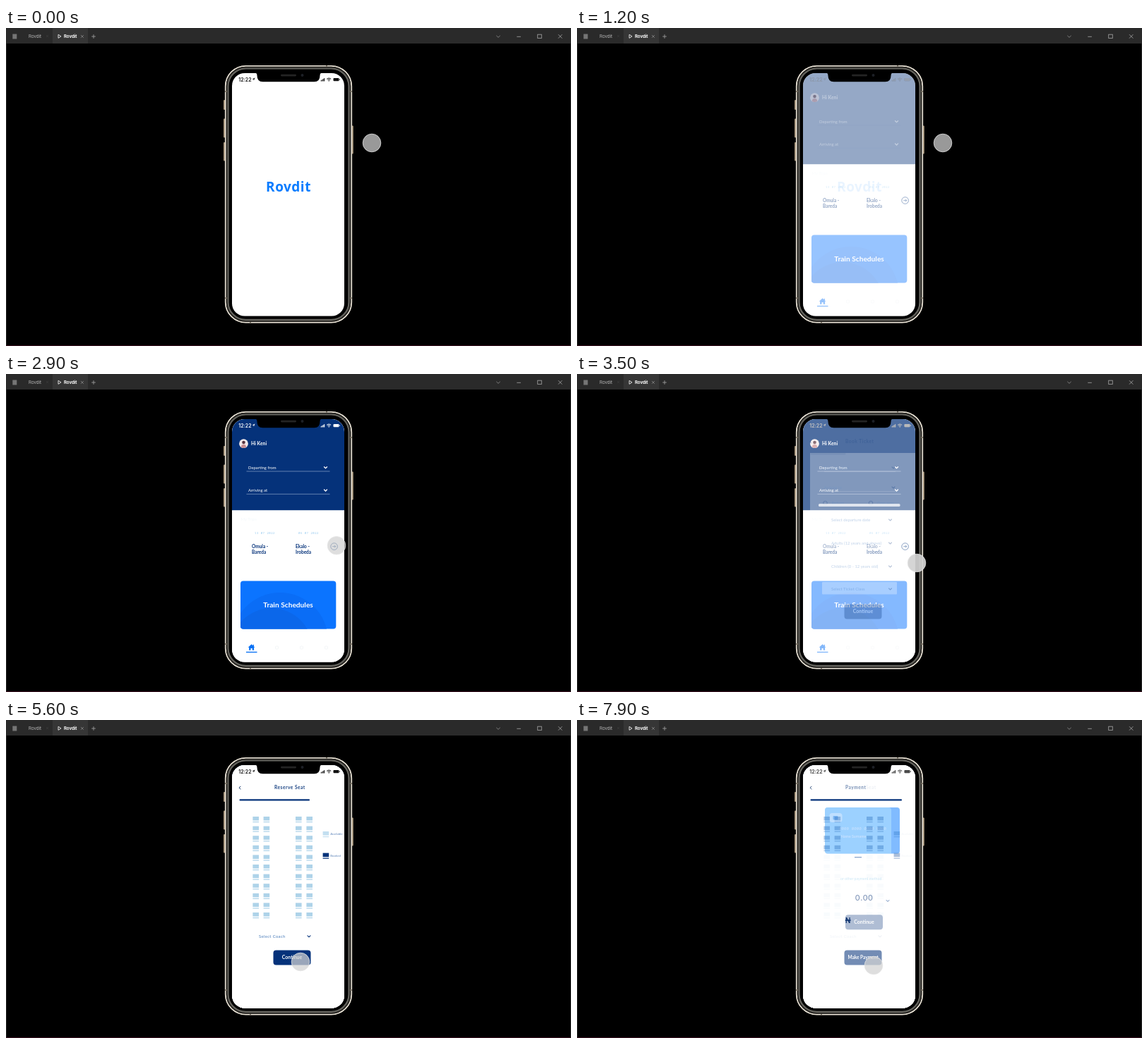
An HTML page for the animation above (8 s loop, 800 px wide and 451 px high).

```html
<!DOCTYPE html>
<html lang="en">
<head>
<meta charset="utf-8">
<title>Ticket app prototype</title>
<style>
html, body { margin: 0; width: 100%; height: 100%; overflow: hidden; background: #000; }
svg { display: block; width: 100vw; height: 100vh; }
text { font-family: Lato, "Open Sans", sans-serif; white-space: pre; }
.ui { font-family: Inter, Roboto, sans-serif; }
.logo { font-family: "Open Sans", "Noto Sans", sans-serif; }
.mono { font-family: "Noto Sans Mono", "DejaVu Sans Mono", monospace; }
</style>
</head>
<body>
<svg id="stage" viewBox="0 0 800 451" preserveAspectRatio="none"></svg>
<script>
const LOOP = 8000, STEP = 100;
const BRAND = 'Rovdit';
const NAVY = '#05327a', BLUE = '#0a7cff', LINK = '#2c68b4';

// Markup helpers
const rect = (x, y, w, h, fill, more = '') =>
  `<rect x="${x}" y="${y}" width="${w}" height="${h}" fill="${fill}" ${more}/>`;
const text = (x, y, s, size, fill, more = '') =>
  `<text x="${x}" y="${y}" font-size="${size}" fill="${fill}" ${more}>${s}</text>`;
const line = (d, color, w = 1, more = '') =>
  `<path d="${d}" fill="none" stroke="${color}" stroke-width="${w}" ${more}/>`;
const circle = (x, y, r, fill, more = '') =>
  `<circle cx="${x}" cy="${y}" r="${r}" fill="${fill}" ${more}/>`;
const group = (s, more = '') => `<g ${more}>${s}</g>`;
const down = (x, y, color, w = 1.1, more = '') =>
  line(`M${x - 2} ${y - 1}l2 2l2 -2`, color, w, `stroke-linecap="round" ${more}`);
const bold = 'font-weight="700"', mid = 'text-anchor="middle"';
const range = (n, f) => Array.from({ length: n }, (_, i) => f(i)).join('');

function windowBar() {
  const g = '#9b9b9b';
  return rect(0, 0, 800, 22, '#2a2a2a') + rect(66, 0, 50, 22, '#363636') +
    rect(9.3, 8.5, 6, 7, '#757575') +
    text(32, 14.2, BRAND, 6.2, '#b9b9b9', 'class="ui"') +
    line('M57 10l3 3m0 -3l-3 3', '#404040', .7) +
    line('M74 9.3v5l4 -2.5z', '#eee', .9) +
    text(82, 14.2, BRAND, 6, '#fff', 'class="ui" font-weight="700"') +
    line('M106 10l3.8 3.8m0 -3.8l-3.8 3.8', '#8c8c8c', .8) +
    line('M121.2 12h5.6m-2.8 -2.8v5.6', g, .9) +
    line('M694.3 10.8l2.7 2.5l2.7 -2.5', '#858585', .9) +
    line('M723.3 12.3h5.6', g, .9) +
    rect(752.7, 9.2, 5.6, 5.2, 'none', `stroke="${g}" stroke-width=".9"`) +
    line('M782 9.2l5.4 5.4m0 -5.4l-5.4 5.4', g, .9) +
    line('M.5 22V450M799.5 22V450', '#242424') + rect(0, 450, 800, 1, '#38101f');
}

function phoneBody() {
  const button = (x, y, h) => rect(x, y, 2.4, h, '#a9977d', 'rx="1"');
  const ring = (d, color, w) => rect(310.5 + d, 53.5 + d, 179 - 2 * d, 364.4 - 2 * d,
    '#000', `rx="${29 - d}" stroke="${color}" stroke-width="${w}"`);
  return button(308, 102, 14) + button(308, 128.5, 27) + button(308, 162, 26.5) +
    button(489.4, 138.5, 40) +
    ring(.3, '#efe8db', 1.8) + ring(2, '#2e2c28', 1.6) + ring(4, '#676660', 2.2) +
    line('M310 90h3M310 383h3M487 90h3M487 383h3', '#756c5d', 1.6) +
    circle(346, 417.7, 1, '#6f675a') + circle(454, 53.8, 1, '#6f675a');
}

function status(c) {
  return group(text(329.3, 75.6, '12:22', 7, c, 'class="ui" font-weight="600"') +
    `<path d="M352.6 70.5l-4.1 2l2 .3l.3 2z" fill="${c}"/>` +
    range(4, i => rect(445.6 + i * 1.5, 74.2 - i, 1.1, 1.3 + i, c)) +
    line('M454.2 72.2q3 -2.4 6 0M455.5 73.6q1.7 -1.4 3.4 0', c, 1) +
    circle(457.2, 75, .7, c) +
    rect(463.5, 71, 8, 4.2, c, 'rx="1"') + rect(472, 72.2, .7, 1.8, c));
}

const white = () => rect(320, 64, 160, 345, '#fff');
const title = (s, more = '') =>
  text(380, 98.2, s, 6.6, '#1d4685', `${bold} letter-spacing=".5" ${more}`);
const back = () => line('M332.2 93.9l-2 2.2l2 2.2', '#0b2f66', 1);
const action = (s, size = 7, more = '') => group(
  rect(378.5, 326.5, 53, 21, NAVY, 'rx="4"') +
  text(405, 339.3, s, size, '#fff', `${bold} ${mid}`), more);

function splash() {
  return white() + status('#111') +
    text(400, 232, BRAND, 19, BLUE, `id="brand" class="logo" ${bold} ${mid} letter-spacing=".5"`);
}

function home() {
  const field = (y, s) => group(text(343, y + 2, s, 5.9, '#fff') + down(452.5, y, '#fff', 1.3) +
    line(`M340.5 ${y + 5.3}H458.5`, '#8ba2c6', .7));
  const trip = (x, date, a, b) => group(
    text(x + 4, 227.3, date, 4, '#8fc6ee', 'class="mono" letter-spacing=".5"') +
    text(x, 246.7, a + ' -', 6.5, NAVY, bold) + text(x, 255.2, b, 6.5, NAVY, bold));
  return white() + rect(320, 64, 160, 129.2, NAVY) + status('#fff') +
    group(circle(336.5, 98.7, 6.4, '#f3e9ea') +
      '<path d="M332.7 103.8q.4 -4 3.8 -4t3.8 4q-3.8 2.4 -7.6 0z" fill="#c98f92"/>' +
      circle(336.5, 97, 2.3, '#5a3540')) +
    text(347, 101.2, 'Hi Keni', 6.8, '#fff', bold) +
    field(132.7, 'Departing from') + field(165, 'Arriving at') +
    text(332.5, 207.5, 'My Trips', 6, '#f3f8fb') +
    trip(348, '13 07 2022', 'Omula', 'Bareda') + trip(410, '06 07 2022', 'Ekalo', 'Irobeda') +
    group(circle(464.6, 244.6, 4.8, 'none', 'stroke="#0b3a80"') +
      line('M462.3 244.6h4.5m-1.9 -1.9l1.9 1.9l-1.9 1.9', '#0b3a80', .9)) +
    group(rect(332, 293.5, 135.3, 68, '#0b74ff', 'rx="4"') +
      group(circle(388, 378, 68, '#0a6df6') + circle(376, 390, 58, '#0b67ea'), 'clip-path="url(#tile)"') +
      text(399.6, 330.7, 'Train Schedules', 10.2, '#fff', `${bold} ${mid}`)) +
    group('<path d="M347.6 383.3l4.9 4.5h-1.4v4h-2.4v-2.8h-2.2v2.8h-2.4v-4h-1.4z" fill="#0a72f5"/>' +
      rect(349.7, 383.8, 1.3, 2.6, '#0a72f5') + rect(340, 393.8, 15.5, 1.4, '#0a72f5')) +
    group(range(3, i => rect(381.5 + i * 35, 386, 4, 4, 'none', 'rx="1" stroke="#eef1f4" stroke-width=".7"')));
}

function book() {
  const route = (y, s) => group(text(350, y + 2, s, 5.3, '#5e8fca') + down(448, y, NAVY) +
    line(`M350 ${y + 5.5}H451`, '#f2f5f9', .6));
  const radio = (x, tx, s) => group(circle(x, 183, 2.8, 'none', `stroke="${NAVY}" stroke-width=".9"`) +
    text(tx, 185, s, 5.7, '#5585c2', 'letter-spacing=".15"'));
  const pick = (y, s) => rect(347, y - 10, 106, 17.5, '#fff', 'rx="1"') +
    text(360, y + 2, s, 5.9, LINK) + down(443.5, y, NAVY);
  return white() + rect(330, 112, 150, 297, '#fff') + status('#111') + back() + title('Book Ticket') +
    route(132.8, 'Departing from') + route(161, 'Arriving to') +
    radio(351.5, 360.5, 'Return') + radio(416, 425, 'One-way') +
    pick(207, 'Select departure date') + pick(240, 'Adults (12 years and above)') +
    pick(273, 'Children (0 - 12 years old)') + pick(305, 'Select Ticket Class') +
    action('Continue');
}

const seat = (x, y, c) => rect(x, y, 8.6, 5.6, c) + rect(x, y + 7, 8.6, 1.2, c);
const seats = (rows, c, more) => group(range(rows, r =>
  [349.4, 364.6, 410, 425.4].map(x => seat(x, 137 + r * 13.6, c)).join('')), more);

function reserve() {
  const out = 'class="leaving"';
  return white() + status('#111') + back() + title('Reserve Seat', out) +
    seats(11, '#aed3e9', out) +
    group(seat(448.6, 158, '#c3dff0') + text(459.3, 163.4, 'Available', 4.4, '#5b82b8'), out) +
    group(seat(448.6, 188.6, NAVY) + text(459.3, 194, 'Booked', 4.4, '#5b82b8'), out) +
    text(358, 309.2, 'Select Coach', 5.9, '#4a7cba', `letter-spacing=".35" ${out}`) +
    down(429, 306.8, NAVY, 1.1, out) + action('Continue', 7, 'id="moving"');
}

function payment() {
  return white() + status('#111') + back() + title('Payment') +
    rect(351, 124, 106, 65.5, '#1c86ff', 'rx="4"') +
    group('<path d="M351 128q0 -4 4 -4H441q4 0 4 4V189.5H355q-4 0 -4 -4z" fill="#c4f0ff" fill-opacity=".75"/>' +
      rect(357.5, 132, 18, 13, '#f2fcff', 'rx="4"') + rect(362.5, 136, 7, 5.5, '#7fb9ee', 'rx="1"') +
      text(371, 156, '0000 0000 0000 0000', 5.9, '#fff', 'class="mono"') +
      text(374, 166.8, 'Name Surname', 5.2, '#fff', bold)) +
    seats(4, '#1f62b4', 'class="faint"') +
    group(seat(448.6, 158, '#2f78c6') + seat(448.6, 188.6, '#2e62a8'), 'class="faint"') +
    rect(393, 194, 10, 1.3, '#2f5fa6') +
    text(373, 226.8, 'or other payment method', 5.2, '#a3d4ee') +
    text(406.9, 256, '0.00', 11, '#052f74', `${mid} letter-spacing="1"`) +
    down(440, 256.5, '#5f83b5') + action('Make Payment', 6.5);
}

const stage = document.getElementById('stage');
const screens = { splash, home, book, reserve, payment };
stage.innerHTML =
  '<defs><clipPath id="glass"><rect x="320" y="64" width="159" height="344.6" rx="18"/></clipPath>' +
  '<clipPath id="tile"><rect x="332" y="293.5" width="135.3" height="68" rx="4"/></clipPath></defs>' +
  rect(0, 0, 800, 451, '#000') + windowBar() + phoneBody() +
  group(Object.keys(screens).map(k => group(screens[k](), `id="${k}"`)).join('') +
    rect(342, 184, 115.5, 4, '#fff', 'id="slide" rx="1.5"') +
    rect(330.5, 112.2, 50, 2.2, NAVY, 'id="progress" rx="1"') +
    text(379.2, 287.8, '₦', 11, '#0a2f6b', `id="naira" ${bold}`), 'clip-path="url(#glass)"') +
  '<path d="M352 63.5q3.5 0 3.5 4q0 8.7 8 8.7H436.5q8 0 8 -8.7q0 -4 3.5 -4z" fill="#000"/>' +
  rect(389, 65.8, 22, 2.6, '#242424', 'rx="1.3"') + circle(419.5, 67, 2, '#1d2026') +
  circle(0, 0, 12.8, '#d2d2d2', 'id="cursor" stroke="#e4e4e4" stroke-width=".8"');

const $ = id => document.getElementById(id);
const clamp = v => Math.min(1, Math.max(0, v));
const ease = (t, start, span) => {
  const x = clamp((t - start) / span);
  return x * x * (3 - 2 * x);
};

// Each layer of a screen dissolves on its own; leaving layers also fade out
function fade(id, p, out = 0) {
  const g = $(id);
  g.style.display = p ? '' : 'none';
  for (const layer of g.children) {
    const kind = layer.classList;
    layer.style.opacity = p * (kind.contains('faint') ? .6 : 1) *
      (kind.contains('leaving') ? clamp(1 - 1.5 * out) : 1);
  }
}

// Pointer path: time, x, y
const path = [
  [1800, 518, 163], [1900, 499, 198], [2500, 476, 232], [3000, 466, 246], [3300, 470, 253],
  [3500, 481, 268], [3900, 467, 297], [4500, 431, 328], [5000, 414, 338], [6200, 420, 348]
];

function pointer(t) {
  if (t <= path[0][0]) return path[0].slice(1);
  for (let i = 1; i < path.length; i++) {
    const [t0, x0, y0] = path[i - 1], [t1, x1, y1] = path[i];
    if (t <= t1) {
      const k = (t - t0) / (t1 - t0);
      return [x0 + (x1 - x0) * k, y0 + (y1 - y0) * k];
    }
  }
  return path[path.length - 1].slice(1);
}

function draw(t) {
  const toHome = ease(t, 885, 700), toBook = ease(t, 3250, 700);
  const toSeat = ease(t, 4850, 750), toPay = ease(t, 7620, 520);
  const quick = clamp(toPay * 1.8);
  fade('home', toHome);
  fade('book', toBook);
  fade('reserve', toSeat, toPay);
  fade('payment', toPay);
  $('brand').style.opacity = clamp(1 - 2 * toHome);

  $('slide').style.opacity = 4 * toBook * (1 - toBook) * .9;
  $('progress').style.opacity = toBook < 1 ? toBook * toBook : 1;
  $('progress').setAttribute('width', 50 + 49.5 * toSeat + 30 * quick);
  $('moving').style.opacity = toSeat * (1 - .5 * toPay);
  $('moving').setAttribute('transform', `translate(${1.5 * quick} ${-90 * toPay})`);
  $('naira').style.opacity = quick;

  const [x, y] = pointer(t), press = clamp(1 - Math.abs(t - 3500) / 200);
  const c = $('cursor');
  c.setAttribute('cx', x);
  c.setAttribute('cy', y);
  c.setAttribute('fill-opacity', .73 + .2 * press);
}

function tick(now) {
  draw(Math.floor((now % LOOP) / STEP) * STEP);
  requestAnimationFrame(tick);
}
draw(0);
requestAnimationFrame(tick);
</script>
</body>
</html>
```
